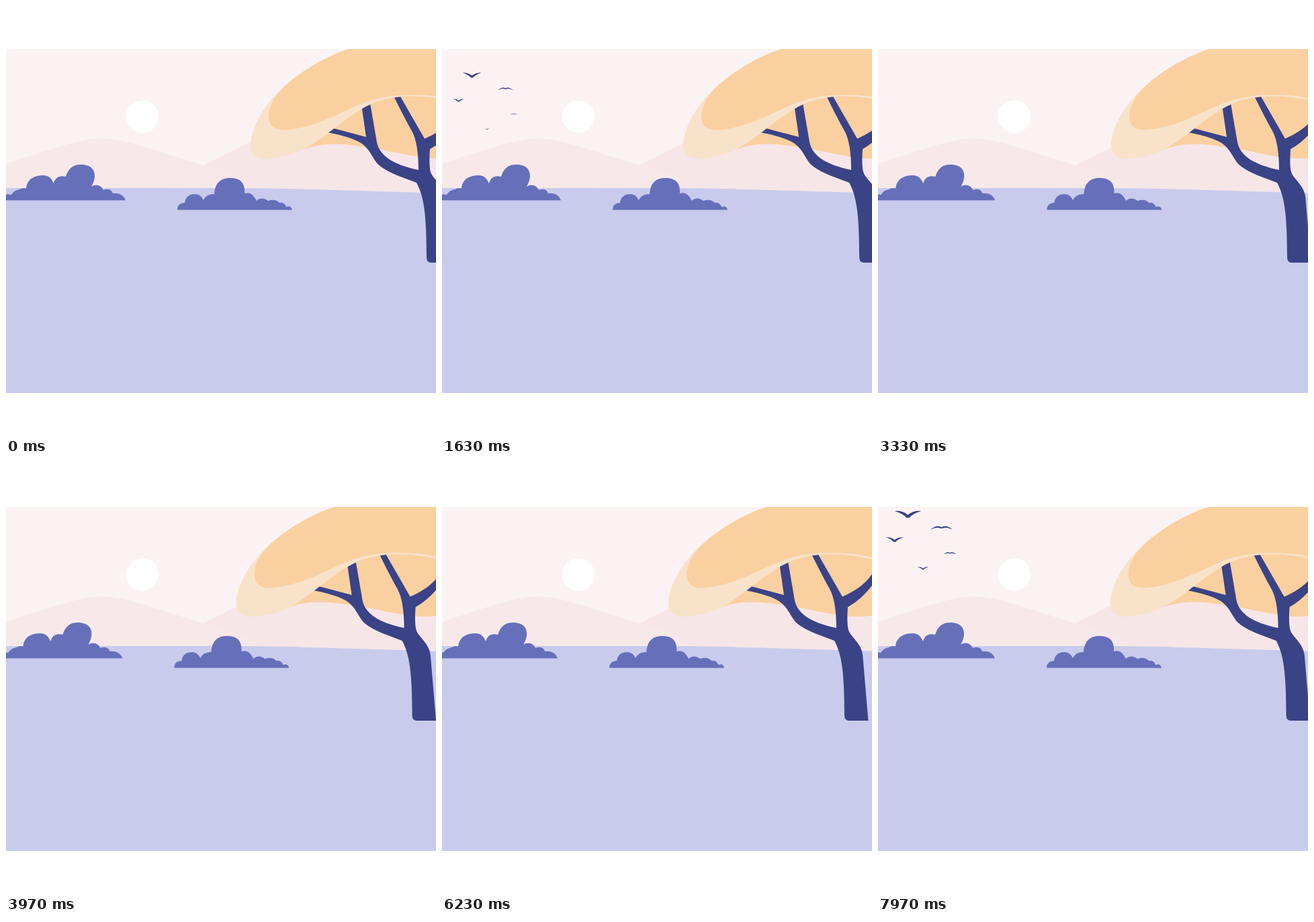
Animation of 640x640 px, one loop 8000 ms. Source, as an HTML page:

```html
<!DOCTYPE html>
<html lang="en">
<head>
<meta charset="utf-8">
<title>Savanna</title>
<style>
  html, body { margin: 0; width: 100%; height: 100%; overflow: hidden; background: #fff; }
  svg { display: block; width: 100vw; height: 100vh; }
</style>
</head>
<body>
<svg viewBox="0 0 640 640">
  <defs>
    <clipPath id="stage"><rect y="64" width="640" height="512"/></clipPath>
    <linearGradient id="haze" gradientUnits="userSpaceOnUse" x1="0" y1="0" x2="370" y2="0">
      <stop offset=".4" stop-color="#f7e9ea"/>
      <stop offset="1" stop-color="#f6e7e9"/>
    </linearGradient>
  </defs>
  <g clip-path="url(#stage)">
    <rect y="64" width="640" height="512" fill="#fbf2f3"/>
    <circle cx="203" cy="164.5" r="24.3" fill="#fff"/>
    <path fill="#f6e6e8" d="M230 270 L295 237 C320 224 345 210 370 200 C430 180 560 180 640 190 V290 H230Z"/>
    <path fill="url(#haze)" d="M0 235 C60 215 112 197 142 197 C180 197 240 222 295 237 C335 246 365 256 372 275 H0Z"/>
    <path fill="#c8cbec" d="M0 271 H340 C420 271 540 276 640 278.5 V576 H0Z"/>
    <g id="birds" fill="#3a4386"></g>
    <g id="bushes" fill="#6670ba">
      <path d="M-10 289.3 V282 Q0 279 8 281 Q12 274 20 273 Q25 270 30 271.5 C31 258 42 252 55 252 C64 252 68 257 71 264 C74 253 82 252 89 254 C93 240 102 236 111 236 C126 236 132 243 132 253 C132 260 128 267 127 269 C134 264 142 267 145 274 C152 271 158 274 159 279 C168 278 175 281 178 289.3Z"/>
      <path d="M255 303.5 C255 296 260 293 266 293 C267 284 273 280 281 280 C287 280 291 283 294 289 C297 282 303 280 310 280 C311 265 318 256 333 256 C350 256 356 264 355 279 C364 276 369 282 373 290 C378 285 385 286 390 290 C398 287 405 290 407 293 C412 292 416 295 417 299 C422 297 425 299 426 303.5Z"/>
    </g>
    <g id="tree">
      <path fill="#fad0a0" d="M440 214.5 C480 198 520 208 560 214 C600 222 620 227 645 227 C665 227 680 224 690 220 V130 H560Z"/>
      <path fill="#3a4386" d="M478 188 L487 182 L536 195 L529 147 L542 145 L552 203 C556 222 575 236 614 244 C614 220 611 198 604 186 C595 170 588 156 577 134 L586 133 L623 197.5 C640 190 656 180 667 164 L690 140 V160 L667 181 C657 194 645 205 631 213 C630 228 630 240 632 247 C635 258 653 267 653.500 288 L661.500 382 H633 Q626 382 626 374 C626 310 622 283 611 263 C590 255 565 247 553 235 C545 225 541 213 530 205 C520 198 500 192 478 188Z"/>
      <path fill="#f8e2ca" d="M364 207 C365 180 385 145 412 122 C440 97 480 74 510 64 H700 V153 L668 142.500 C615 130 565 130 525 156 C490 178 470 200 440 215 C430 220 408 227 386 227 C371 227 364 219 364 207Z"/>
      <path fill="#fad0a0" d="M510 64 C470 77 435 100 412 122 C398 137 391 151 391 164 C391 178 400 184.500 413 184.500 C455 183 490 162 530 145 C565 131 605 130 640 134 C655 136 680 141 700 147 V64Z"/>
    </g>
  </g>
</svg>
<script>
const LOOP = 8000, FLIGHT = 5950, FLAP = 410;

// start: height at take-off; delay: climb before it appears; grow: width per unit of climb
const flock = [
  { x: 44.5, start: 172, delay: 0, grow: 0.4, side: 1 },
  { x: 94.5, start: 193, delay: 5, grow: 0.35, side: -1 },
  { x: 24.8, start: 210, delay: 31, grow: 0.4, side: 1 },
  { x: 107, start: 231, delay: 30, grow: 0.28, side: -1 },
  { x: 67, start: 253, delay: 53, grow: 0.36, side: 1 }
];

const byId = id => document.getElementById(id);
for (const bird of flock) {
  bird.path = document.createElementNS('http://www.w3.org/2000/svg', 'path');
  byId('birds').append(bird.path);
}

// Unit-wide bird; lift runs from -1 (wings down) to 1 (wings up)
function birdShape(lift) {
  const tip = -0.1 * lift;
  const arch = -0.13 + 0.02 * lift;
  const back = 0.02 + 0.04 * lift;
  const belly = 0.1 + 0.07 * lift;
  const under = -0.02 + 0.02 * lift;
  return `M-.5 ${tip} Q-.2 ${arch} 0 ${back} Q.2 ${arch} .5 ${tip}` +
         `Q.2 ${under} .05 ${belly} H-.05 Q-.2 ${under} -.5 ${tip}Z`;
}

function draw(t) {
  // Slow sideways drift, nearer things further
  const drift = -(1 + Math.cos(Math.PI * (t - 5750) / 5700)) / 2;
  byId('tree').setAttribute('transform', `translate(${27.5 * drift})`);
  byId('bushes').setAttribute('transform', `translate(${5.9 * drift})`);

  const flight = t % FLIGHT;
  const climb = 70 * Math.pow(Math.max(0, flight - 100) / 1530, 1.5);
  const beat = Math.cos(2 * Math.PI * (flight - 1640) / FLAP);
  for (const { x, start, delay, grow, side, path } of flock) {
    const size = Math.max(0, climb - delay) * grow;
    path.setAttribute('d', birdShape(beat * side));
    path.setAttribute('transform', `translate(${x} ${start - climb}) scale(${size})`);
    path.style.display = size > 0 ? '' : 'none';
  }
}

const began = performance.now();
function tick() {
  draw((performance.now() - began) % LOOP);
  requestAnimationFrame(tick);
}
tick();
</script>
</body>
</html>
```
